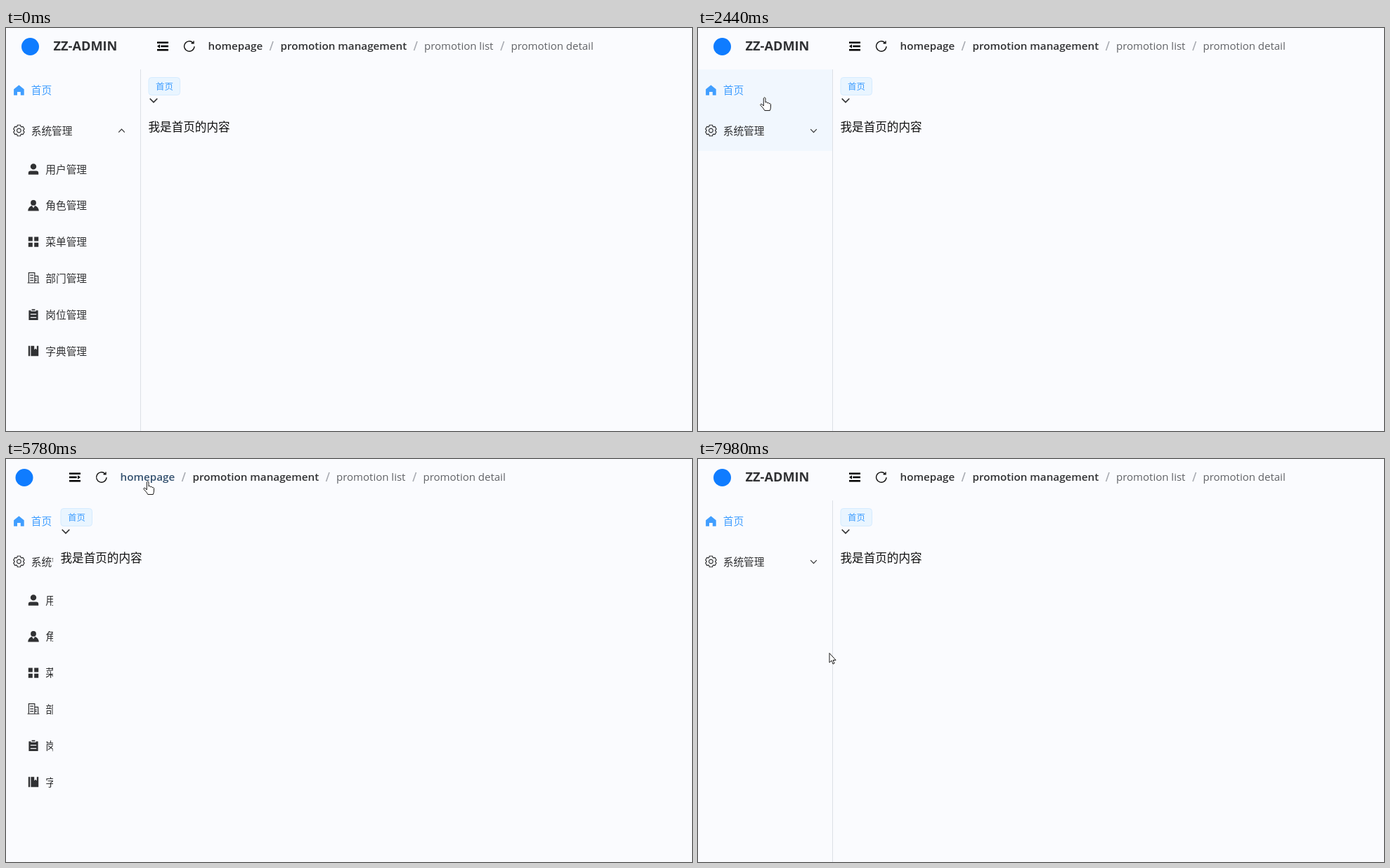
An HTML page for the animation above (8 s loop, 976 by 574 pixels).

```html
<!DOCTYPE html>
<html lang="zh-CN">
<head>
<meta charset="utf-8">
<style>
html, body { margin: 0; width: 100%; height: 100%; overflow: hidden; background: #fafbfe; }
svg { display: block; }
text { font-family: "Open Sans", "Noto Sans CJK SC", "Noto Sans CJK", sans-serif; fill: #303133; }
.cjk { font-family: "Noto Sans CJK SC", "Noto Sans CJK", sans-serif; font-size: 14.7px; }
.crumb { font-size: 15px; }
.bold { font-weight: 600; font-size: 15.2px; }
.icon { fill: #303133; fill-rule: evenodd; }
.line { fill: none; stroke: #303133; stroke-width: 1.2; }
.row { fill: #eaf4ff; }
text.grey { fill: #606266; }
text.blue, path.blue { fill: #409eff; }
</style>
</head>
<body>
<svg width="976" height="574">
  <svg id="side" width="192" height="574">
    <g id="brand">
      <circle cx="34.5" cy="26.5" r="12.5" fill="#0f7cff"/>
      <text id="title" x="67.5" y="31.5" font-size="18.2" font-weight="700">ZZ-ADMIN</text>
    </g>
    <svg id="menu" width="192" height="574">
      <rect id="row1" class="row" y="59" width="192" height="58"/>
      <rect id="row2" class="row" y="117" width="192" height="58"/>
      <path class="blue" transform="translate(18.4 88.5)" d="M0-7.300-7.300-1.200V7.300H-2.400V2.400H2.400V7.300H7.300V-1.200z"/>
      <g class="line" transform="translate(18.4 146)">
        <path id="gear" stroke-linejoin="round"/>
        <circle r="2.9"/>
      </g>
      <g id="labels">
        <text class="cjk blue" x="35.7" y="94">首页</text>
        <text class="cjk" x="35.7" y="151.5">系统管理</text>
        <path id="caret" class="line" d="M-4.300 2.200 0-2.200 4.300 2.200"/>
      </g>
      <svg id="sub" y="175" width="192" height="311"></svg>
    </svg>
    <rect id="edge" y="59" width="1" height="515" fill="#dcdfe6"/>
  </svg>

  <g id="page">
    <path id="fold" d="M-8-6.500H8V-4H-8zM-2.700-1.300H8V1.300H-2.700zM-8 4H8V6.500H-8zM-4-2.700V2.700L-8 0z"/>
    <path class="line" transform="translate(260.8 26)" style="stroke:#111;stroke-width:1.4" d="M7.200.3A7.200 7.200 0 1 1 5.100-5.100M6.200-7.500V-4.200H2.800"/>
    <text id="home" class="crumb bold" x="287.5" y="31">homepage</text>
    <text class="crumb bold" x="390.5" y="31">promotion management</text>
    <text class="crumb grey" x="595" y="31">promotion list</text>
    <text class="crumb grey" x="718.5" y="31">promotion detail</text>
    <path class="line" style="stroke:#a8abb2;stroke-width:1.6" d="M375.500 32l4.500-13M580.500 32l4.500-13M704 32l4.500-13"/>
    <rect x="203" y="70.5" width="44.5" height="25" rx="4" fill="#e9f5ff" stroke="#d5ebff"/>
    <text class="cjk blue" x="213" y="88" style="font-size:12.5px">首页</text>
    <path class="line" style="stroke-width:1.7" d="M204.700 100.500l5.300 5.300 5.300-5.300"/>
    <text class="cjk" x="202.5" y="147" style="font-size:16.6px;fill:#111">我是首页的内容</text>
  </g>

  <path id="cursor" fill="#fff" stroke="#1a1a1a" stroke-linejoin="round"/>
</svg>
<script>
const $ = id => document.getElementById(id);
const set = (id, attrs) => { for (const k in attrs) $(id).setAttribute(k, attrs[k]); };
const show = (id, on) => { $(id).style.display = on ? '' : 'none'; };

const FULL = 192, SLIM = 50;
const CLOSE = 2130, OPEN = 4290, SHRINK = 5604, GROW = 6878, FADE = 300, LAG = 59;
const ARROW = 'M.5.5V14l3-3L5.600 16l2-1-2-4.500h4z';
const HAND = 'M.5 2q1.300-2.500 2.700 0v6q1.300-2 2.600.5V9q1.300-2 2.500.5v.5q1.500-1.500 2.400.5V14q0 3-1.200 5.500H2Q1 17-4.200 11.500q.8-2.500 3-.5L.5 13z';

const items = {
  用户管理: 'M-4.200-3.600a4.200 4.200 0 0 1 8.400 0a4.200 4.200 0 0 1-8.400 0M-7.200 7.800V5.400q0-3 3-3h8.400q3 0 3 3V7.800z',
  角色管理: 'M-3.900-3.900a3.900 3.900 0 0 1 7.800 0a3.900 3.900 0 0 1-7.800 0M2.200.3Q7.500 2 7.800 7.800H-7.800Q-7.500 2-2.200.3L0 3.600z',
  菜单管理: [[-7.2, -7.2], [1.2, -7.2], [-7.2, 1.2], [1.2, 1.2]].map(p => `M${p}h6v6h-6z`).join(''),
  部门管理: 'M-6.600 6.600V-7.800H1.800V6.600M1.800-3H6.600V6.600M-8.400 6.600H8.400M-4.800-4.200H0M-4.800-.6H0M-4.800 3H0M2.400.6h2.400M2.400 3h2.400',
  岗位管理: 'M3.600-6h3V7.800H-6.600V-6h3v1.200h7.200zM-2.400-7.800h4.800V-6h-4.800zM-4.200-1.200h8.400V0h-8.400zM-4.200 3.600h8.400v1.200h-8.400z',
  字典管理: 'M1.200-7.200v5.400L3-3.600l1.800 1.800v-5.400h2.400V7.200H-3.600V-7.200zM-7.200-7.200h2.400V7.200h-2.400z'
};
$('sub').innerHTML = Object.entries(items).map(([name, d], i) => `
  <g transform="translate(39 ${26 + i * 51.8})">
    <path class="${d.endsWith('z') ? 'icon' : 'line'}" d="${d}"/>
    <text class="cjk" x="17.3" y="5.5">${name}</text>
  </g>`).join('');

// six teeth, four corners each
set('gear', {
  d: 'M' + Array.from({ length: 24 }, (_, i) => {
    const tip = i % 4 === 1 || i % 4 === 2;
    const a = (Math.floor(i / 4) * 60 + (i % 4 < 2 ? -1 : 1) * (tip ? 15 : 28) - 90) * Math.PI / 180;
    const r = tip ? 8 : 6.1;
    return `${r * Math.cos(a)} ${r * Math.sin(a)}`;
  }).join('L') + 'Z'
});

// CSS cubic-bezier, solved by bisection
function bezier(x, x1, y1, x2, y2) {
  if (x <= 0) return 0;
  if (x >= 1) return 1;
  const at = (s, a, b) => 3 * s * (1 - s) * (1 - s) * a + 3 * s * s * (1 - s) * b + s * s * s;
  let lo = 0, hi = 1;
  for (let i = 0; i < 20; i++) {
    const mid = (lo + hi) / 2;
    if (at(mid, x1, x2) < x) lo = mid; else hi = mid;
  }
  return at(lo, y1, y2);
}
const ease = (t, start) => bezier((t - start) / FADE, .25, .1, .25, 1);
const inOut = (t, start) => bezier((t - start) / FADE, .42, 0, .58, 1);
const widthAt = t => Math.round(FULL - (FULL - SLIM) * (ease(t, SHRINK) - ease(t, GROW)));

// pointer moves: leave at, arrive at, x, y; it rests in between
const moves = [
  [190, 740, 197, 180], [740, 990, 156, 46], [990, 1500, 90, 88], [1600, 1920, 126, 137],
  [2160, 2440, 93, 98], [2440, 2860, 5, 118], [2860, 3140, -20, 132], [3280, 3610, 95, 93],
  [3810, 3990, 142, 134], [4310, 4620, 242, 60], [4620, 4970, 218, 27], [5630, 5780, 200, 31],
  [5780, 6320, 82, 30], [6530, 6610, 76, 28], [6880, 7040, 359.5, 189],
  [7040, 7740, 841, 534], [7740, 7980, 186.5, 276]
];
function pointAt(t) {
  let x = 458, y = 572;
  for (const [from, to, nx, ny] of moves) {
    const p = Math.min(1, Math.max(0, (t - from) / (to - from)));
    x += (nx - x) * p;
    y += (ny - y) * p;
  }
  return [x, y];
}

// share of the last 300 ms the pointer spent inside a box
function hover(t, inside) {
  const steps = 20;
  let hits = 0;
  for (let i = 0; i < steps; i++) {
    const past = t - i * FADE / steps;
    if (inside(...pointAt(past), widthAt(past))) hits++;
  }
  return hits / steps;
}
const inRow = top => (x, y, w) => x >= 0 && x < w && y >= top && y < top + 58;
const inHome = (x, y, w) => x > w + 95 && x < w + 173 && y < 36;

function draw(t) {
  const width = widthAt(t), menuWidth = widthAt(t - LAG);
  const slim = t >= SHRINK && t < GROW;
  const shrunk = SHRINK + LAG + FADE;
  const open = t < shrunk ? 1 - inOut(t, CLOSE) + inOut(t, OPEN) : 0;

  set('side', { width });
  set('menu', { width: menuWidth });
  set('edge', { x: menuWidth - 1 });
  set('page', { transform: `translate(${width - FULL})` });
  set('brand', { transform: `translate(${slim ? (width - 68) / 2 - 8 : (width - FULL) / 2})` });
  show('title', !slim);
  set('fold', { transform: `translate(223 26) scale(${slim ? -1 : 1} 1)` });

  show('labels', t < shrunk || t >= GROW + LAG + FADE);
  show('sub', open > 0);
  set('sub', { height: 311 * open });
  set('caret', { transform: `translate(164.5 146.4) rotate(${180 * (1 - open)})` });
  set('row1', { opacity: hover(t, inRow(59)) });
  set('row2', { opacity: hover(t, inRow(117)) });
  $('home').style.fill = `color-mix(in srgb, #409eff ${100 * hover(t, inHome)}%, #303133)`;

  show('cursor', t >= 190);
  set('cursor', { d: t < 990 || t > 6880 ? ARROW : HAND, transform: `translate(${pointAt(t)})` });
}

function frame() {
  draw(performance.now() % 8000);
  requestAnimationFrame(frame);
}
frame();
</script>
</body>
</html>
```
